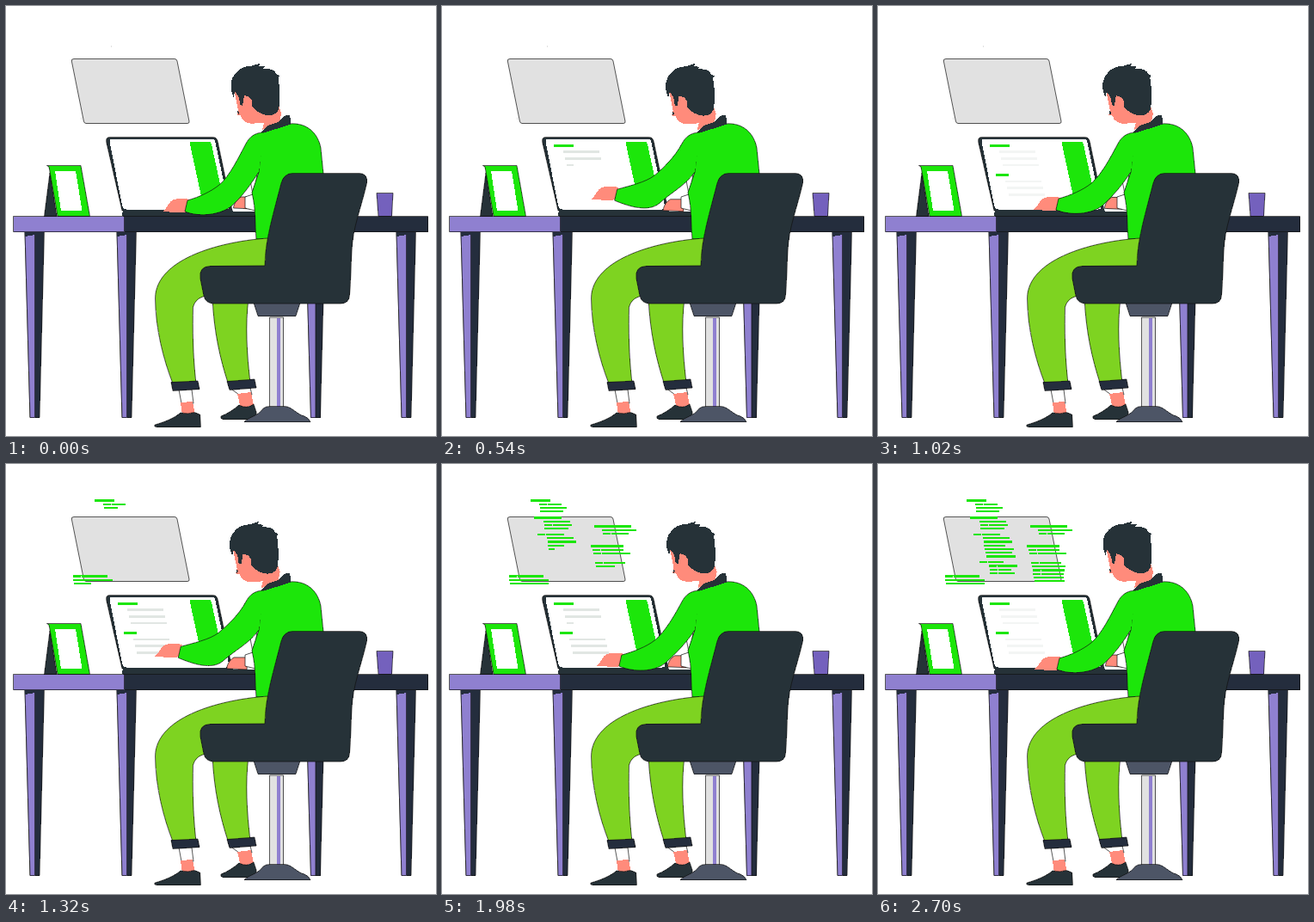
Recreate the animation shown at these times as an HTML page. Size 500 by 500 pixels, loop 2730 ms.

```html
<!DOCTYPE html>
<html lang="en">
<head>
<meta charset="utf-8">
<title>Coding at a desk</title>
<style>
  html, body { margin: 0; width: 100%; height: 100%; overflow: hidden; background: #fff; }
  svg { display: block; width: 100vw; height: 100vh; shape-rendering: crispEdges; }
  .ink { stroke: #111; stroke-width: .7; stroke-linejoin: round; }
  .dark { fill: #263238; }
  .navy { fill: #242d3d; }
  .lilac { fill: #8f80d0; }
  .green { fill: #1ce60a; }
  .lime { fill: #7ed321; }
  .skin { fill: #ff8b7b; }
  .slate { fill: #4d5566; }
  .pale { fill: #e1e1e1; }
  .white { fill: #fff; }
  .grey { fill: #e1e6e3; }
</style>
</head>
<body>
<svg viewBox="0 0 500 500">
  <path class="pale ink" d="M79 61.500H196Q198.500 61.500 199 64L213 134Q213.500 136.500 211 136.500H93Q91 136.500 90.400 134L76.300 64Q75.800 61.500 79 61.500Z"/>
  <g id="panel"></g>

  <path class="dark ink" d="M121 152.500H240Q245 152.500 246 157L263 238H135L116.700 158Q115.700 152.500 121 152.500Z"/>
  <path class="white" d="M124 154.500H239Q242.500 154.500 243.300 158L259 232Q260 236.500 256 236.500H140Q136 236.500 135 232L120.800 159Q120 154.500 124 154.500Z"/>
  <path class="green" d="M217 157.500H235Q238 157.500 239 161L252 221Q253 224 249 224H230Q227.500 224 227 221L214 161Q213.500 157.500 217 157.500Z"/>
  <g id="code"></g>
  <path class="dark" d="M138 236.500H262L264 238.500H290V244.500H136Q133 241 138 236.500Z"/>

  <path class="dark ink" d="M51 194L59 244.500H44.500Z"/>
  <path class="green ink" d="M47.500 185.500H87L97.500 244.500H60L50 187Z"/>
  <path class="white" d="M57 192H81L88.500 238H64Z"/>
  <path class="ink" fill="#7461bd" d="M431 217.500H450L448.500 244.500H433Z"/>

  <g id="legs"></g>
  <path class="navy ink" d="M137.500 244.500H490.500V262.500H137.500Z"/>
  <path class="lilac ink" d="M8.500 244.500H137.500V262.500H8.500Z"/>

  <path class="white ink" d="M292 195L284 203L288 224Z"/>
  <path id="farHand" class="skin ink" d="M264.500 235C265 229 269 224 273 222H288V236Z"/>
  <path class="white ink" d="M278 222L290 218V238L278 235Z"/>
  <path class="green ink" d="M298 147L329 137C351 135 363 149 366 165L370 205L330 271H291C289 252 291 238 286 217L294 193Z"/>

  <g id="head">
    <path class="skin" d="M265 97L270 121L268.500 127L273 127.500C274 134 282 138 289 136.500L300 136L298 144L318 136L320 125L312 100Z"/>
    <path class="dark" d="M264.500 106C259 95 261 83 268 77C272 72 278 70 284 70L296 66.500L294 69.500L301 70.500L299 73C309 72 314 76 314 79L318 81L316.500 83C319 98 318.500 114 317 120C313 130 300 129 290 121L285 116L283 106L277 104L275 116L272 115C272 107 269 102 266 100Z"/>
    <path class="skin" d="M286 119C280 122 275 117 276 110C277 104 284 104 286 110Z"/>
    <path class="dark" d="M269 121.500L271.500 124L270 127Z"/>
  </g>
  <path class="dark" d="M296 147.500L304 139L317 135L323 128L330 126.500L331.500 137.500L298 148Z"/>
  <path id="hand" class="skin" d="M182 239C188 235 189 227 195 225Q204 223 214 225L211 239C202 242 194 239 182 239Z"/>
  <path id="arm" class="green ink"/>

  <path class="white ink" d="M260 444H284L286 452H271Z"/>
  <path class="skin" d="M269 451L285 449L288 464L273 468Z"/>
  <path class="dark ink" d="M250 477C258 474 265 469 271 464Q280 469 288 463L291 472V480.500H252Q249 480 250 477Z"/>
  <path class="lime ink" d="M240 340C242 380 249 410 258 438H284C280 405 278 370 282 340Z"/>
  <path class="navy ink" d="M257 436.500L289 434L291 444L260 446.500Z"/>

  <path class="white ink" d="M201 446H216L218 462H204Z"/>
  <path class="skin" d="M203 461L217 460L219.500 474L205 476Z"/>
  <path class="dark ink" d="M173 487C184 484 196 479 203 473Q212 475 219 472.500L225.500 475L226.500 489.500H176Q172 490 173 487Z"/>
  <path class="lime ink" d="M305 270C255 273 174 292 173.500 340C174 376 183 411 194 439H221C217 405 217 375 217.500 350C221 338 231 337 240 336L302 320Z"/>
  <path class="navy ink" d="M192 437.500L223 436L225 445.500L194 447.500Z"/>

  <path class="slate ink" d="M288 345H342L337 360.500H293Z"/>
  <path class="pale ink" d="M306.500 362H322.500V468H306.500Z"/>
  <path class="lilac" d="M314.500 363H319V466H314.500Z"/>
  <path class="slate ink" d="M277 483.500C282 478 293 477 299 468Q302 465.500 307 465.500H324C333 466 338 475 347 477Q352 479 354 483.500Z"/>
  <path class="dark ink" d="M333 194.500H411Q421 195 419.500 206C413 235 403 258 402 285C401 303 401 320 399.500 336Q399 346 389 346H242Q232 346 230 337L226 317Q224 303 237 302.500L301 302C301 272 312 238 320 206Q323 195 333 194.500Z"/>
</svg>
<script>
const LOOP = 2730, STEP = 30, SWING = 910;
const $ = id => document.getElementById(id);
const clamp = v => Math.max(0, Math.min(1, v));

let seed = 7;
const rand = () => (seed = seed * 16807 % 2147483647) / 2147483647;

function add(tag, parent, attrs) {
  const el = document.createElementNS("http://www.w3.org/2000/svg", tag);
  for (const k in attrs) el.setAttribute(k, attrs[k]);
  return parent.appendChild(el);
}

for (const x of [22, 129, 348.5, 454]) {
  const leg = (cls, d) => add("path", $("legs"), { class: cls, d: `M${x} 262` + d });
  leg("navy ink", "h22.500l-5.500 216.500h-11z");
  leg("lilac ink", "h11.500v216.500h-5.500z");
  leg("navy", "h12v4l-12 2z");
}

// A typed line grows from its left end, restarting at each of its start times
const lines = [];
function addLine(parent, cls, x, y, w, h, starts, dur) {
  const el = add("rect", parent, { class: cls, x, y: y - h / 2, height: h, width: 0 });
  lines.push({ el, w, starts, dur });
  return el;
}

// Groups of rows typed one after another; rows below the first are indented
function column(start, gap, width, groups) {
  for (const [x, top, rows, indent] of groups) {
    for (let i = 0; i < rows; i++, start += gap) {
      const left = x + (i && indent + i * 0.8), y = top + i * 4.25;
      addLine($("panel"), "green", left, y, width * (0.8 + 0.4 * rand()), 2.2, [start], 125);
      if (rand() < 0.4)
        add("rect", $("panel"), { class: "pale", x: left + 9, y: y - 1, width: 1, height: 2 });
    }
  }
}
column(1115, 70, 29, [[103, 42.5, 4, 9], [107, 62.5, 4, 10], [111, 82, 7, 10], [118, 114.3, 4, 10]]);
column(1385, 75, 37, [[177, 72.5, 3, 8], [173, 95.5, 3, 1], [178, 115, 6, 0]]);
column(1115, 75, 39, [[77.5, 130.5, 3, 0]]);

// A green heading with three grey lines stepping right with the screen
const greys = [];
function paragraph(x, y, w, headAt, bodyAt) {
  addLine($("code"), "green", x, y, w, 3, headAt, 240);
  for (let i = 0; i < 3; i++) {
    const starts = bodyAt.map(t => t + 100 + i * 110);
    greys.push(addLine($("code"), "grey", x + 11 + 2 * i, y + 7.6 * (i + 1), 42, 2.6, starts, 100));
  }
}
paragraph(130, 162, 23, [0, 1596, 2140], [200, 1640]);
paragraph(137, 196.5, 15, [580, 2155], [580, 2155]);

// The shoulder stays put while elbow and wrist swing
function armPath(p) {
  const shift = (dx, dy) => (x, y) => `${x + dx * p} ${y + dy * p} `;
  const elbow = shift(-1, -12), under = shift(-11, -3), wrist = shift(-8, -14);
  return "M300 147C290 147 283 152 279 160C271 175 "
    + elbow(260, 198) + elbow(248, 208)
    + "C" + elbow(238, 216) + wrist(225, 222) + wrist(211, 226)
    + "L" + wrist(208, 239)
    + "C" + wrist(225, 246) + under(250, 243) + under(263, 232)
    + "C" + under(276, 220) + "284 208 294 193";
}

function draw(t) {
  const p = (1 - Math.cos(2 * Math.PI * t / SWING)) / 2;
  const move = (id, dx, dy) => $(id).setAttribute("transform", `translate(${dx * p} ${dy * p})`);
  $("arm").setAttribute("d", armPath(p));
  move("hand", -9.5, -15.5);
  move("farHand", -8, 3);
  move("head", -1.5, 0.4);

  for (const { el, w, starts, dur } of lines) {
    const start = starts.findLast(s => s <= t) ?? t;
    el.setAttribute("width", w * clamp((t - start) / dur));
  }
  const dim = Math.max(clamp(1 - Math.abs(t - 1020) / 200), clamp((t - 2500) / 200));
  for (const el of greys) el.setAttribute("opacity", 1 - 0.6 * dim);
}

const begin = performance.now();
function tick() {
  const t = (performance.now() - begin) % LOOP;
  draw(Math.floor(t / STEP) * STEP);
  requestAnimationFrame(tick);
}
tick();
</script>
</body>
</html>
```
